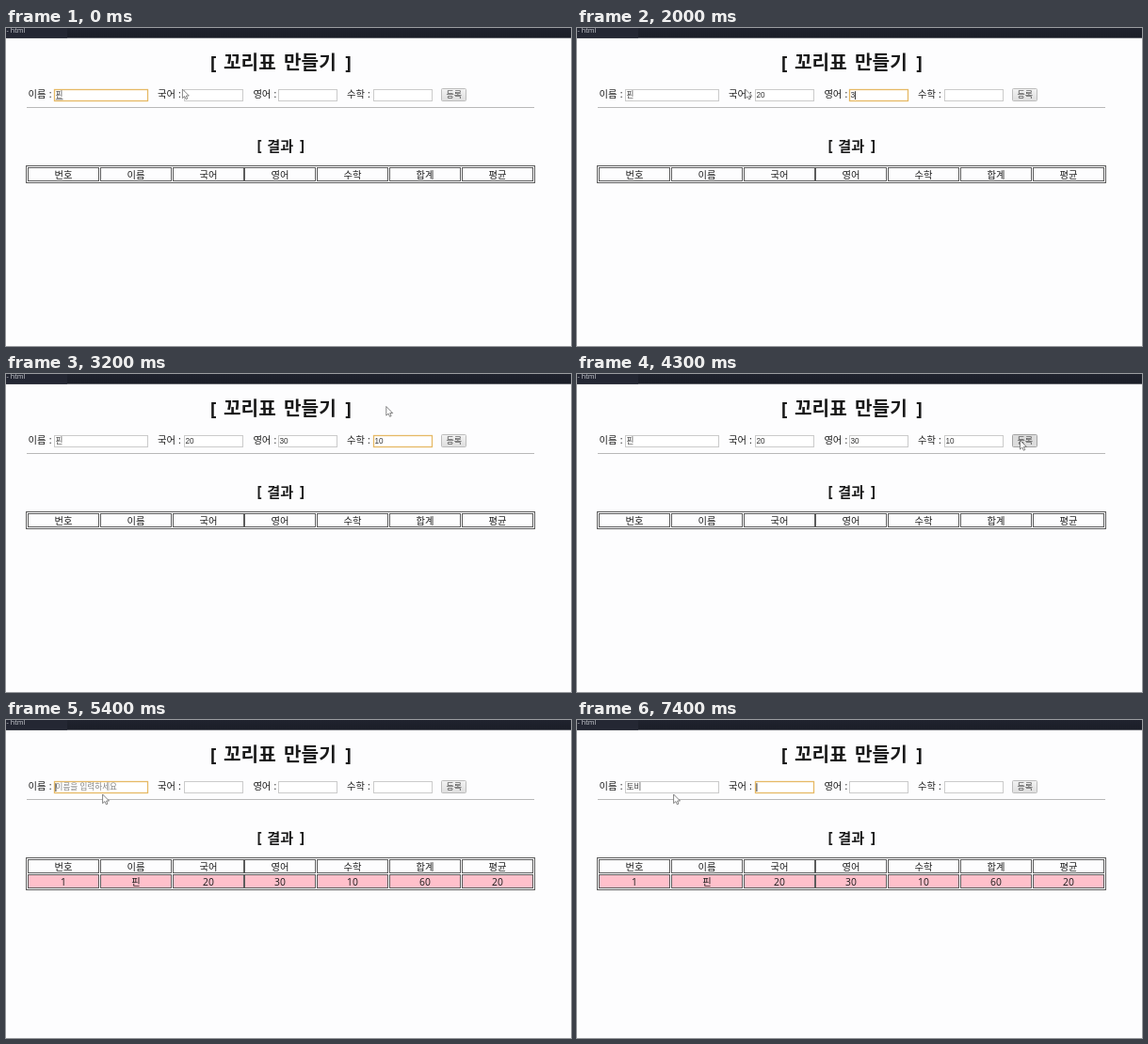
Recreate the animation shown at these times as an HTML page. Size 600x338 px, loop 8000 ms.

```html
<!DOCTYPE html>
<html lang="ko">
<head>
<meta charset="utf-8">
<title>꼬리표 만들기</title>
<style>
  html, body { margin: 0; width: 100%; height: 100%; overflow: hidden; background: #fdfdfe; }
  svg { display: block; width: 600px; height: 338px; font-family: "Open Sans", "Noto Sans CJK KR", "Noto Sans CJK", sans-serif; }
  text { white-space: pre; fill: #1a1a1a; }
  .h1 { font-size: 20.2px; font-weight: 700; }
  .h2 { font-size: 15.2px; font-weight: 700; }
  .label, .cell { font-size: 10.3px; }
  .label { word-spacing: .5px; }
  .cell { text-anchor: middle; }
  .end { text-anchor: end; }
  .value { font: 8.2px "Liberation Sans", Arial, sans-serif; fill: #333; }
  .name { font-size: 8.6px; fill: #444; }
  .hint { fill: #858585; }
  .box { fill: #fff; stroke: #cbcbcb; }
  .box.focus { stroke: #e6b965; stroke-width: 1.3; }
  .line { fill: none; stroke: #5c5c5c; }
  .button { fill: url(#face); stroke: #bdbdbd; }
  .button.hover { stroke: #a4a4a4; }
  .button.down { fill: #dcdcdc; stroke: #a4a4a4; }
</style>
</head>
<body>
<svg viewBox="0 0 600 338">
  <defs>
    <linearGradient id="face" x2="0" y2="1">
      <stop offset="0" stop-color="#f3f3f3"/><stop offset="1" stop-color="#dedede"/>
    </linearGradient>
    <linearGradient id="bar" x2="0" y2="1">
      <stop offset="0" stop-color="#20232e"/><stop offset="1" stop-color="#1a1d27"/>
    </linearGradient>
  </defs>
  <rect width="600" height="338" fill="#fdfdfe"/>
  <rect width="600" height="10.7" fill="url(#bar)"/>
  <rect width="65" height="10.7" fill="#242733"/>
  <text x=".6" y="5.2" style="font-size:7.2px;fill:#d0d2d8">- html</text>

  <g class="h1">
    <text x="216.8" y="44.4">[</text><text x="231" y="44.4">꼬리표</text>
    <text x="295" y="44.4">만들기</text><text class="end" x="367" y="44.4">]</text>
  </g>
  <g class="h2">
    <text x="266.6" y="131">[</text><text x="277.2" y="131">결과</text>
    <text class="end" x="317" y="131">]</text>
  </g>
  <path d="M22 84.5H561" stroke="#b8b8b8"/>

  <g id="form"></g>
  <rect id="button" class="button" x="462.5" y="64.5" width="26" height="13" rx="1"/>
  <text x="467.4" y="74.4" style="font-size:9px;fill:#444">등록</text>
  <path id="ime" stroke="#555" stroke-width=".8"/>
  <path id="caret" stroke="#222" stroke-width=".9"/>

  <rect id="frame" class="line" x="21.5" y="146.5" width="540"/>
  <g id="head"></g>
  <g id="row"></g>
  <path id="pointer" d="M0 0V9.6L2.3 7.6L3.8 10.8L5.3 10.1L4 7H6.9Z" fill="#fff" stroke="#666" stroke-width=".8" stroke-linejoin="round"/>
</svg>
<script>
const LOOP = 8000;
const $ = id => document.getElementById(id);

function add(parent, tag, attrs, text = '') {
  const el = document.createElementNS('http://www.w3.org/2000/svg', tag);
  for (const key in attrs) el.setAttribute(key, attrs[key]);
  el.textContent = text;
  return parent.appendChild(el);
}

const fields = [
  ['이름 :', 23.6, 51.5, 99], ['국어 :', 161, 189.5, 62],
  ['영어 :', 262.4, 289.5, 62], ['수학 :', 362, 390.5, 62]
].map(([label, lx, x, width], i) => {
  add($('form'), 'text', { class: 'label', x: lx, y: 74.4 }, label);
  const box = add($('form'), 'rect', { class: 'box', x, y: 65.5, width, height: 12 });
  const value = add($('form'), 'text', { class: i ? 'value' : 'name', x: x + 1, y: 74.4 });
  return { x, box, value };
});

function drawRow(parent, words, y, fill) {
  words.forEach((word, i) => {
    const x = Math.round(23 + i * 76.8) + 0.5;
    add(parent, 'rect', { class: 'line', x, y, width: 75, height: 14, style: `fill:${fill}` });
    add(parent, 'text', { class: 'cell', x: x + 37.4, y: y + 11 }, word);
  });
}
drawRow($('head'), ['번호', '이름', '국어', '영어', '수학', '합계', '평균'], 148.5, '#fdfdfe');
drawRow($('row'), [1, '핀', 20, 30, 10, 60, 20], 164.5, '#ffc0cb');

// Each step changes part of the form state at its time in ms.
const steps = [
  [0, { at: [187.4, 65], focus: 0, caret: false, ime: true, values: ['핀', '', '', ''], button: '', row: false }],
  [200, { at: [184.5, 65], ime: false }],
  [300, { at: [181.5, 65] }],
  [400, { at: [178.8, 65.2], focus: -1 }],
  [600, { focus: 1, caret: true }],
  [1200, { values: ['핀', '20', '', ''] }],
  [1500, { focus: 2 }],
  [2000, { values: ['핀', '20', '3', ''] }],
  [2200, { values: ['핀', '20', '30', ''] }],
  [2600, { focus: 3 }],
  [2900, { values: ['핀', '20', '30', '1'] }],
  [3000, { values: ['핀', '20', '30', '10'] }],
  [3100, { at: [310, 46] }],
  [3200, { at: [403.8, 34.5], caret: false }],
  [3600, { at: [437, 52] }],
  [3700, { at: [470.5, 66.4], button: 'hover' }],
  [3900, { at: [470.5, 70.4], button: 'down', focus: -1 }],
  [4400, { at: [469.4, 70.4], button: 'hover', values: ['', '', '', ''], row: true }],
  [5000, { at: null, button: '' }],
  [5300, { focus: 0, caret: true }],
  [5400, { at: [102.6, 79] }],
  [5900, { values: ['토비', '', '', ''], ime: true, caret: false }],
  [6500, { focus: 1, ime: false, caret: true }],
  [6800, { caret: false }],
  [7400, { caret: true }]
];

const show = (el, on) => el.style.display = on ? '' : 'none';

function draw(time) {
  const s = {};
  for (const [start, change] of steps) if (start <= time) Object.assign(s, change);

  fields.forEach(({ box, value }, i) => {
    const hint = i === 0 && !s.values[0];
    box.setAttribute('class', i === s.focus ? 'box focus' : 'box');
    value.textContent = hint ? '이름을 입력하세요' : s.values[i];
    value.classList.toggle('hint', hint);
  });

  const nameEnd = 52.6 + s.values[0].length * 7.9;
  $('ime').setAttribute('d', `M${nameEnd - 7.7} 75.8H${nameEnd}`);
  show($('ime'), s.ime);

  const caretOn = s.caret && s.focus >= 0;
  show($('caret'), caretOn);
  if (caretOn) {
    const x = fields[s.focus].x + 1.4 + s.values[s.focus].length * 4.56;
    $('caret').setAttribute('d', `M${x} 67.2V76`);
  }

  $('button').setAttribute('class', 'button ' + s.button);
  show($('row'), s.row);
  $('frame').setAttribute('height', s.row ? 34 : 18);
  show($('pointer'), s.at);
  if (s.at) $('pointer').setAttribute('transform', `translate(${s.at})`);
}

function tick() {
  draw(performance.now() % LOOP);
  requestAnimationFrame(tick);
}
tick();
</script>
</body>
</html>
```
